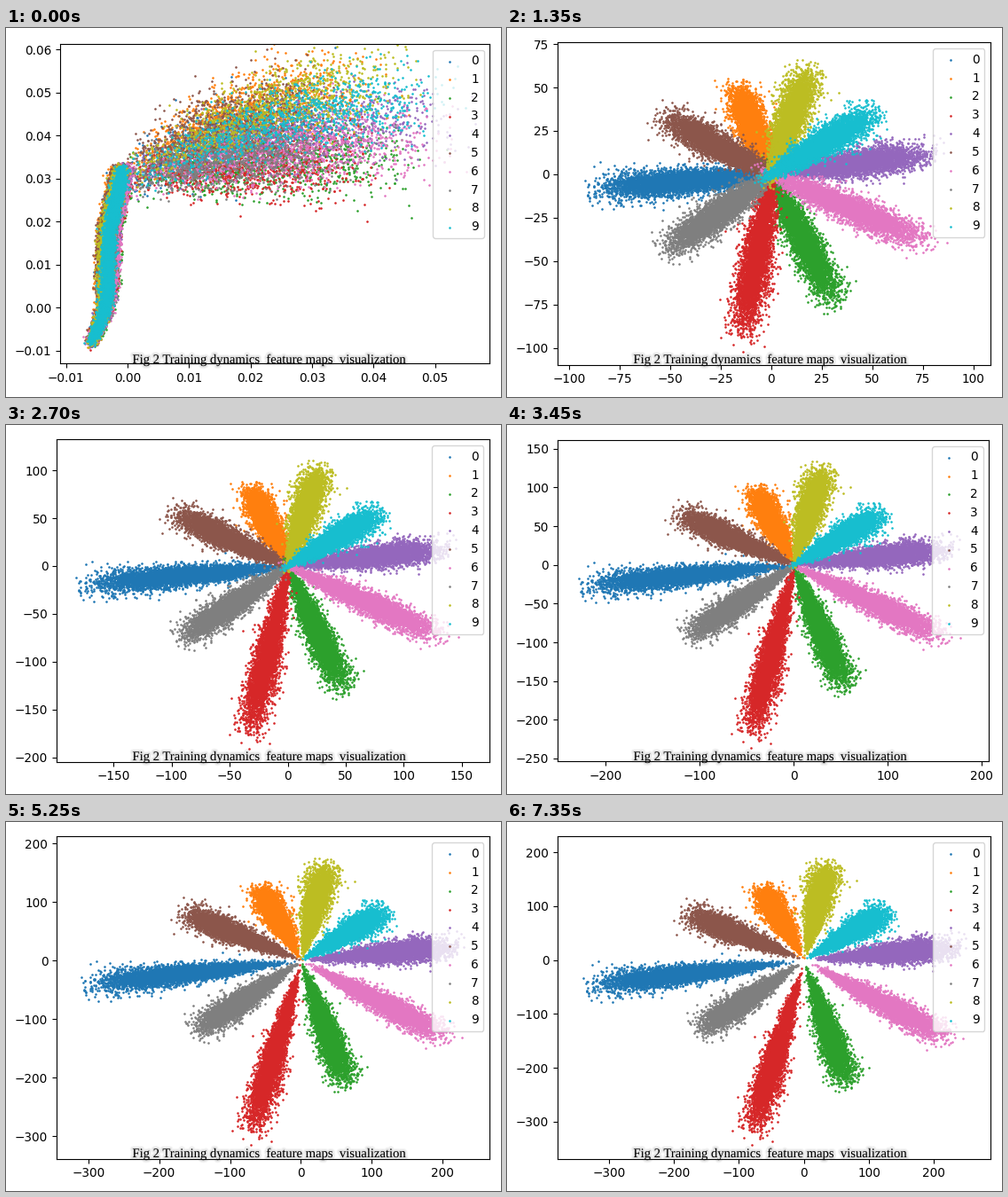
Animation, 558 px wide and 416 px high, one loop 7500 ms. Source, as a matplotlib script:

```python
import numpy as np
import matplotlib.pyplot as plt
import matplotlib.patheffects as pe
from matplotlib.animation import FuncAnimation

W, H, DPI = 558, 416, 100
EPOCHS, STEP = 50, 150
AX_W, AX_H, PAD, RIGHT, TOP = 496, 369, 10, 13, 13.4
N = 5000

plt.rcParams["font.family"] = "DejaVu Sans"

# final direction and length of each class petal
ANGLE = np.radians([188, 116, 286, 256, 6, 154, 327, 219, 79, 36])
REACH = np.array([360, 170, 265, 358, 260, 222, 288, 228, 203, 175])

# axis limits: x0, x1, y0, y1
START = np.array([-.011, .0589, -.013, .0613])
EARLY = np.array([-78.9, 85.6, -76.5, 56.2])
LATE = np.array([-379, 287, -368.8, 229.4])

rng = np.random.default_rng(7)
ALONG = rng.beta(4, 3.8, (10, N))
ACROSS = rng.standard_t(14, (10, N))


def mix(a, b, u):
    return a + (b - a) * u


def untrained(c):
    """Stem near the origin plus a fan of scattered points."""
    r = np.random.default_rng(100 + c)
    a, m = ANGLE[c], N // 5
    q = 1.8 * r.beta(2.4, 2, m)
    root = r.uniform(.025, .033, m)
    fan_x = mix(-.001, .022 + .006 * np.cos(a), q)
    fan_y = mix(root, .040 + .007 * np.sin(a), q * (1.3 - .3 * q))
    fan_x = np.abs(fan_x + r.normal(0, .0035, m) * np.sqrt(q))
    fan_y += r.normal(0, .0036, m) * np.sqrt(q)

    y = mix(-.008, .0325, r.beta(1.15, 1.1, N - m))
    x = np.interp(y, [-.008, 0, .018, .033], [-.0059, -.0036, -.0030, -.0008])
    lift = np.clip(y / .015 + .5, 0, 1)
    x += lift * .0007 * np.cos(a + np.radians(50))
    x += r.normal(0, 1, N - m) * mix(.0004, .00055, lift)
    y += r.normal(0, .0006, N - m)
    return np.column_stack([np.append(fan_x, x), np.append(fan_y, y)])


def petal(c, size, u):
    """Spindle of points that starts blunt and sharpens at its root."""
    a = ANGLE[c] - (1 - u) * .14 * np.cos(ANGLE[c] - np.radians(120))
    short = 62 * (REACH[c] / 250) ** .35 + 7 * np.cos(a + np.radians(30))
    t = mix(1, ALONG[c], 1 + .2 * (1 - u))
    width = mix(8, 22, u) / 2.8 * (1.6 - .6 * size)
    along = t * mix(short, REACH[c], u)
    across = width * ACROSS[c] * (np.maximum(t, .04) / .55) ** mix(.25, .75, u)
    cos, sin = np.cos(a), np.sin(a)
    return size * np.column_stack([along * cos - across * sin,
                                   along * sin + across * cos])


def growth(epoch):
    """Size of the first spread, then the eased growth after it."""
    size = mix(.24, 1, min((epoch - 1) / 4, 1))
    s = max(epoch - 5, 0) / (EPOCHS - 6)
    return size, 1 - (1 - s ** 1.25) ** 2.35


fig = plt.figure(figsize=(W / DPI, H / DPI), dpi=DPI)
ax = fig.add_axes([.1, .1, .8, .8])
dots = [ax.scatter([], [], s=1, color=f"C{c}", label=str(c)) for c in range(10)]

glow = [pe.Stroke(linewidth=w, foreground="#555555", alpha=.06)
        for w in (4.5, 3, 1.8)]
fig.text(142.5 / W, 1 - 378 / H,
         "Fig 2 Training dynamics  feature maps  visualization",
         family="Liberation Serif", size=10.54, color="black",
         path_effects=glow + [pe.Normal()])


def place(left, top, s):
    ax.set_position([left / W, 1 - (top + AX_H * s) / H,
                     AX_W * s / W, AX_H * s / H])
    ax.tick_params(labelsize=10 * s, length=3.5 * s, pad=3.5 * s, width=.8 * s)


def fit_axes():
    """Crop tightly around the labels, then fit that crop into the stage."""
    place(50, TOP, 1)
    box = ax.get_tightbbox(bbox_extra_artists=[])
    left = 50 - box.x0 + PAD
    right = max(RIGHT, box.x1 - 50 - AX_W + PAD)
    total = left + AX_W + right
    s = min(1, W / total)
    place((W - total * s) / 2 + left * s, H * (1 - s) / 2 + TOP * s, s)
    return s


def draw(epoch):
    if epoch == 0:
        limits = START
        clouds = [untrained(c) for c in range(10)]
    else:
        size, u = growth(epoch)
        # the left side lags slightly behind the others
        limits = size * mix(EARLY, LATE, u ** np.array([1.11, 1, 1, 1]))
        clouds = [petal(c, size, u) for c in range(10)]
    ax.set_xlim(limits[:2])
    ax.set_ylim(limits[2:])
    s = fit_axes()
    for d, pts in zip(dots, clouds):
        d.set_offsets(pts)
        d.set_sizes([s * s])
        d.set_linewidth(.9 * s)
    ax.legend(loc="upper right", fontsize=10 * s)
    return dots


anim = FuncAnimation(fig, draw, frames=EPOCHS, interval=STEP,
                     init_func=lambda: dots, repeat=True, repeat_delay=0)
plt.show()
```
